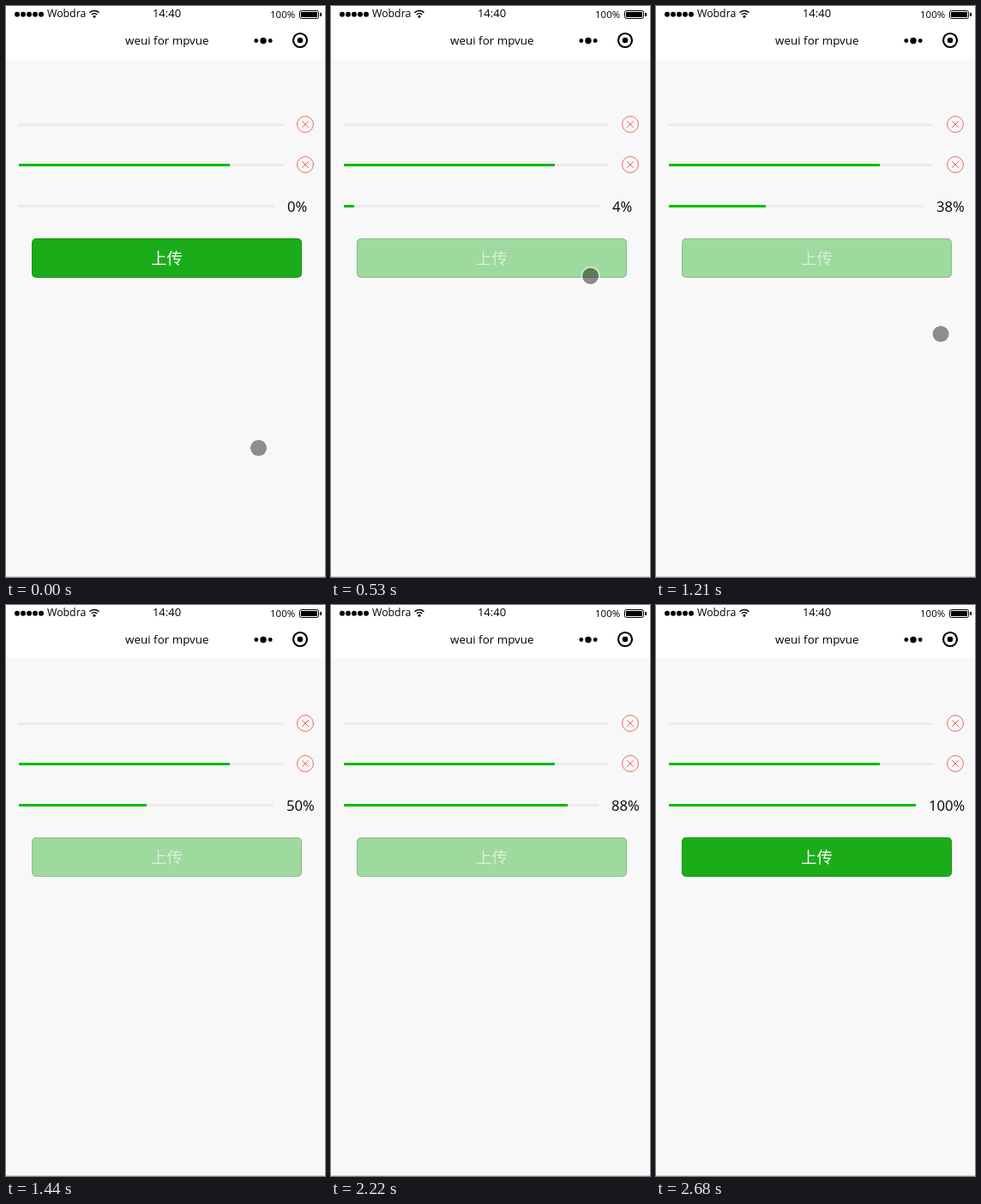
Write an HTML page with a canvas that moves like this. It is 372 px wide and 666 px high and loops after 3.06 s.

```html
<!DOCTYPE html>
<html lang="zh">
<head>
<meta charset="utf-8">
<title>Upload progress</title>
<style>
  html, body { margin: 0; width: 100%; height: 100%; overflow: hidden; background: #f8f8f8; }
  canvas { display: block; width: 372px; height: 666px; }
</style>
</head>
<body>
<canvas id="stage" width="372" height="666"></canvas>
<script>
const ctx = document.getElementById('stage').getContext('2d');
const LOOP = 3060;
const STEP = 77.3;          // the picture updates at this interval
const FIRST_STEP = 588;
const LAST_STEP = 27;
const LATIN = '"Open Sans", "Noto Sans", sans-serif';
const CJK = '"Noto Sans CJK SC", "Noto Sans CJK", sans-serif';

const clamp = (v, lo, hi) => Math.min(hi, Math.max(lo, v));
const phase = (t, from, to) => clamp((t - from) / (to - from), 0, 1);
const mix = (a, b, k) => a + (b - a) * k;
const smooth = k => k * k * (3 - 2 * k);

function rect(x, y, w, h, color) {
  ctx.fillStyle = color;
  ctx.fillRect(x, y, w, h);
}

function disc(x, y, r, color) {
  ctx.fillStyle = color;
  ctx.beginPath();
  ctx.arc(x, y, r, 0, Math.PI * 2);
  ctx.fill();
}

function arc(x, y, r, width, color, from = 0, to = Math.PI * 2) {
  ctx.strokeStyle = color;
  ctx.lineWidth = width;
  ctx.beginPath();
  ctx.arc(x, y, r, from, to);
  ctx.stroke();
}

function rounded(x, y, w, h, r) {
  ctx.beginPath();
  ctx.roundRect(x, y, w, h, r);
}

function text(str, x, y, size, color = '#000', align = 'left', family = LATIN) {
  ctx.font = `${size}px ${family}`;
  ctx.fillStyle = color;
  ctx.textAlign = align;
  ctx.fillText(str, x, y);
}

function drawHeader() {
  rect(0, 0, 372, 62, '#fff');
  for (let i = 0; i < 5; i++) disc(13 + i * 7, 9.7, 3, '#000');
  text('Wobdra', 48, 13, 12.3);
  for (const r of [4.3, 7.6]) arc(103, 13, r, 1.5, '#000', -Math.PI * 0.76, -Math.PI * 0.24);
  disc(103, 12.3, 1.5, '#000');
  text('14:40', 187.5, 13, 13, '#000', 'center');
  text('100%', 308, 14, 11.5);

  ctx.strokeStyle = '#000';
  ctx.lineWidth = 1;
  rounded(342.5, 5.5, 22, 9, 2);
  ctx.stroke();
  rect(344, 7, 19, 6, '#000');
  rect(366, 8, 2, 4, '#000');

  text('weui for mpvue', 187.8, 45, 13.4, '#000', 'center');
  for (const side of [-1, 0, 1]) disc(300 + side * 8.2, 40.5, side ? 2.4 : 3.7, '#000');
  arc(343, 40, 8, 2.2, '#000');
  disc(343, 40, 3.3, '#000');
}

function drawBar(y, width, percent) {
  rect(15, y, width, 3, '#ebebeb');
  rect(15, y, Math.round(width * percent / 100), 3, '#09bb07');
}

function drawCancel(x, y) {
  arc(x, y, 9.4, 0.9, '#f4514c');
  ctx.beginPath();
  for (const s of [-1, 1]) {
    ctx.moveTo(x - 3.8, y - 3.8 * s);
    ctx.lineTo(x + 3.8, y + 3.8 * s);
  }
  ctx.stroke();
}

function drawButton(disabled) {
  ctx.fillStyle = disabled ? '#9ed99d' : '#1aad19';
  rounded(30, 271, 315, 46, 5);
  ctx.fill();
  ctx.strokeStyle = 'rgba(0,0,0,.12)';
  ctx.lineWidth = 1;
  rounded(30.5, 271.5, 314, 45, 4.5);
  ctx.stroke();
  text('上传', 187.5, 301, 18.4, disabled ? 'rgba(255,255,255,.6)' : '#fff', 'center', CJK);
}

function drawPointer(x, y) {
  disc(x, y, 9.6, 'rgba(0,0,0,.43)');
  arc(x, y, 10.4, 1.7, 'rgba(255,255,255,.5)');
}

// Glide up to the button, rest there, then speed away to the right.
function drawPress(t) {
  const glide = smooth(phase(t, 20, 350));
  const drift = phase(t, 360, 900);
  const leave = phase(t, 1050, 1285) ** 2;
  drawPointer(mix(294.5, 301.5, glide) + 4 * drift + 60 * leave,
    mix(515.5, 314.5, glide) + 2 * drift + 149 * leave);
}

// A short visit near the bottom edge.
function drawVisit(t) {
  drawPointer(336.5, mix(615.5, 656, phase(t, 2445, 2610) ** 2));
}

function draw(time) {
  const step = Math.min(LAST_STEP, Math.floor((time - FIRST_STEP) / STEP));
  const t = Math.max(0, FIRST_STEP + step * STEP);
  const percent = clamp(Math.round(7.98 + 3.79 * step), 0, 100);
  const barWidth = percent < 10 ? 298 : percent < 100 ? 297 : 288;

  rect(0, 0, 372, 666, '#f8f8f8');
  drawHeader();
  drawBar(137, 308, 0);
  drawCancel(349, 138);
  drawBar(184, 308, 80);
  drawCancel(349, 185);
  drawBar(232, barWidth, percent);
  text(percent + '%', 15 + barWidth + 15, 240, 16.7);
  drawButton(percent > 0 && percent < 100);
  rect(0, 665, 372, 1, '#d2d2d2');
  if (t < 1350) drawPress(t);
  else if (t > 2430 && step < LAST_STEP) drawVisit(t);
}

const start = performance.now();
function frame() {
  draw((performance.now() - start) % LOOP);
  requestAnimationFrame(frame);
}
frame();
</script>
</body>
</html>
```
